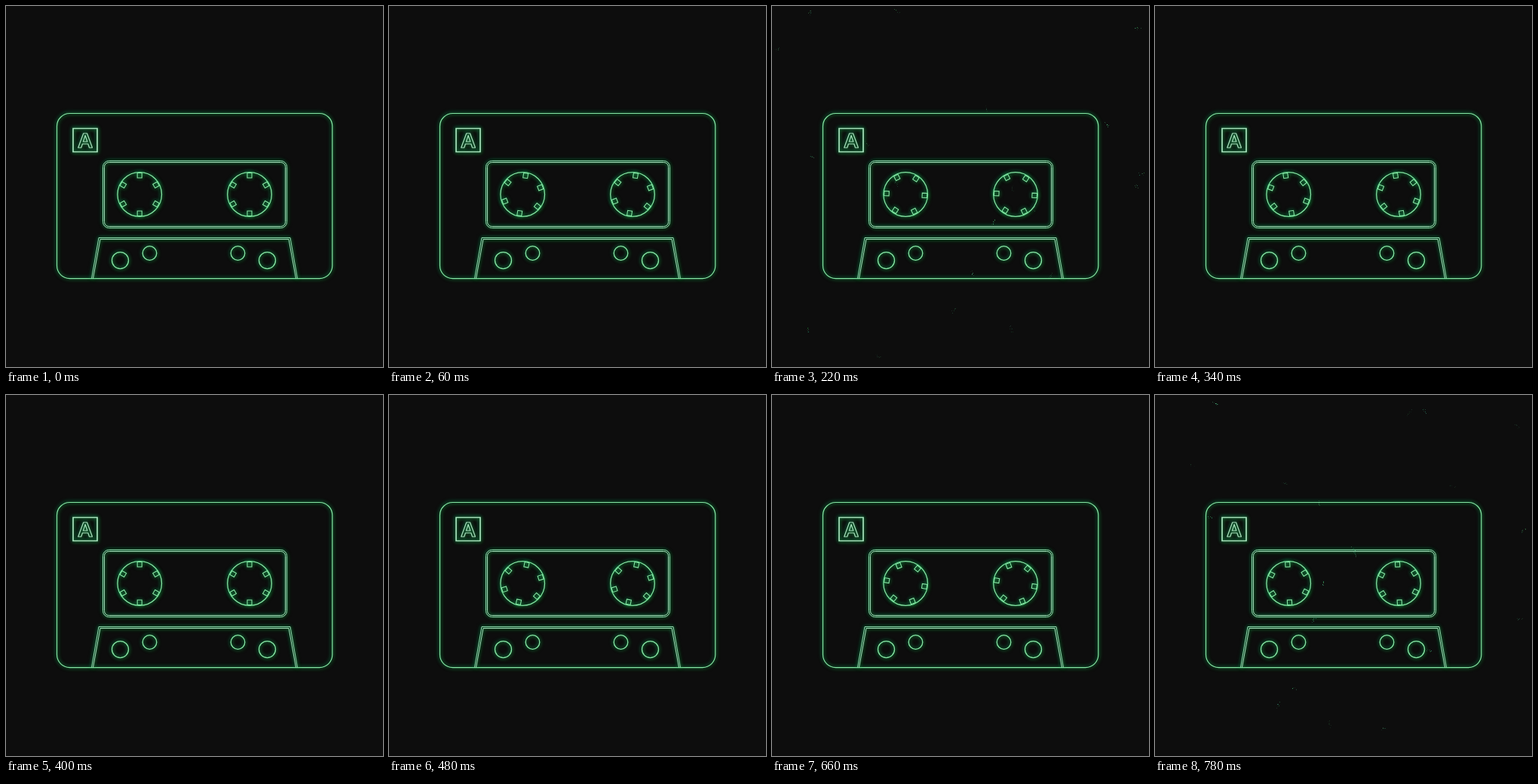
Recreate the animation shown at these times as an HTML page with a canvas. Size 500 by 479 pixels, loop 800 ms.

```html
<!DOCTYPE html>
<html lang="en">
<head>
<meta charset="utf-8">
<title>Neon cassette</title>
<style>
  html, body { margin: 0; width: 100%; height: 100%; overflow: hidden; background: #0d0d0d; }
  canvas { display: block; }
</style>
</head>
<body>
<canvas id="stage" width="500" height="479"></canvas>
<script>
const WIDTH = 500, HEIGHT = 479, LOOP = 800, STEP = 20;
const DEGREES_PER_STEP = 3;
const LINE = '#86e6a4', PALE = '#a9e2bd';
const GLOWS = [['#08b87ca0', -0.8], ['#1cb834a0', 0.8]];
const REEL_Y = 250, REEL_XS = [177.2, 323];

const ctx = document.getElementById('stage').getContext('2d');
const backdrop = document.createElement('canvas');
backdrop.width = WIDTH;
backdrop.height = HEIGHT;

// The glow comes from a stroke drawn off stage, so only its shadow shows.
function neon(c, color, width, stroke) {
  c.save();
  c.strokeStyle = color;
  c.lineWidth = width;
  c.save();
  c.translate(-2 * WIDTH, 0);
  c.shadowBlur = 5;
  for (const [glow, shift] of GLOWS) {
    c.shadowColor = glow;
    c.shadowOffsetX = 2 * WIDTH + shift;
    c.shadowOffsetY = shift;
    stroke();
  }
  c.restore();
  stroke();
  c.restore();
}

function strokePath(c, color, width, build) {
  const path = new Path2D();
  build(path);
  neon(c, color, width, () => c.stroke(path));
}

function box(c, color, width, left, top, right, bottom, radius) {
  strokePath(c, color, width, p => p.roundRect(left, top, right - left, bottom - top, radius));
}

function circle(c, x, y, r) {
  strokePath(c, LINE, 1.3, p => p.arc(x, y, r, 0, Math.PI * 2));
}

function trapezoid(c, inset) {
  const top = 307.5 + inset;
  strokePath(c, PALE, 1, p => {
    p.moveTo(113.5 + inset, 361.5);
    p.lineTo(123 + inset, top);
    p.lineTo(377 - inset, top);
    p.lineTo(386.5 - inset, 361.5);
  });
}

function drawBackdrop() {
  const c = backdrop.getContext('2d');
  c.fillStyle = '#0d0d0d';
  c.fillRect(0, 0, WIDTH, HEIGHT);

  box(c, LINE, 1.2, 67.5, 142.5, 432.8, 361.6, 17);
  box(c, PALE, 1.7, 89, 162.5, 121, 193.5, 0);
  for (const inset of [0, 2]) {
    box(c, PALE, 1, 128.5 + inset, 205.5 + inset, 372.5 - inset, 294.5 - inset, 8 - inset);
    trapezoid(c, inset);
  }

  c.font = 'bold 28px "Liberation Sans", Arial, sans-serif';
  c.textAlign = 'center';
  c.lineJoin = 'round';
  neon(c, PALE, 1.2, () => c.strokeText('A', 105, 188));

  for (const side of [-1, 1]) {
    circle(c, 249 + side * 97.5, 337.6, 11);
    circle(c, 249 + side * 58.5, 328, 9.3);
  }
  REEL_XS.forEach(x => circle(c, x, REEL_Y, 29.3));
}

function drawTeeth(x, degrees) {
  strokePath(ctx, LINE, 1.1, path => {
    for (let i = 0; i < 6; i++) {
      const tooth = new Path2D();
      tooth.rect(-3, -28.5, 6, 6.5);
      path.addPath(tooth, new DOMMatrix().translate(x, REEL_Y).rotate(degrees + i * 60));
    }
  });
}

function seeded(seed) {
  return () => {
    seed = (seed * 16807) % 2147483647;
    return seed / 2147483647;
  };
}

// A spark is a short broken trail of single-pixel dots.
function drawSpark(random, strength) {
  const x = random() * WIDTH, y = random() * HEIGHT;
  const angle = random() * Math.PI;
  const glow = strength * (0.2 + 0.6 * random() ** 2);
  for (let i = -4; i < 4; i++) {
    const px = x + Math.cos(angle) * i + random() * 3;
    const py = y + Math.sin(angle) * i + random() * 3;
    ctx.globalAlpha = glow * random();
    ctx.fillStyle = `hsl(${130 + random() * 35} 60% ${45 + random() * 25}%)`;
    ctx.fillRect(Math.round(px), Math.round(py), 1, 1);
  }
}

// Sparks flare up briefly around each peak time.
function drawSparks(time) {
  ctx.save();
  for (const peak of [220, 780]) {
    const strength = 1 - Math.abs(time - peak) / 40;
    if (strength <= 0) continue;
    const random = seeded(peak * 7919);
    for (let i = 0; i < 20; i++) drawSpark(random, strength);
  }
  ctx.restore();
}

function draw(now) {
  const step = Math.floor((now % LOOP) / STEP);
  ctx.drawImage(backdrop, 0, 0);
  REEL_XS.forEach(x => drawTeeth(x, step * DEGREES_PER_STEP));
  drawSparks(step * STEP);
}

const start = performance.now();
function tick() {
  draw(performance.now() - start);
  requestAnimationFrame(tick);
}

drawBackdrop();
tick();
</script>
</body>
</html>
```
